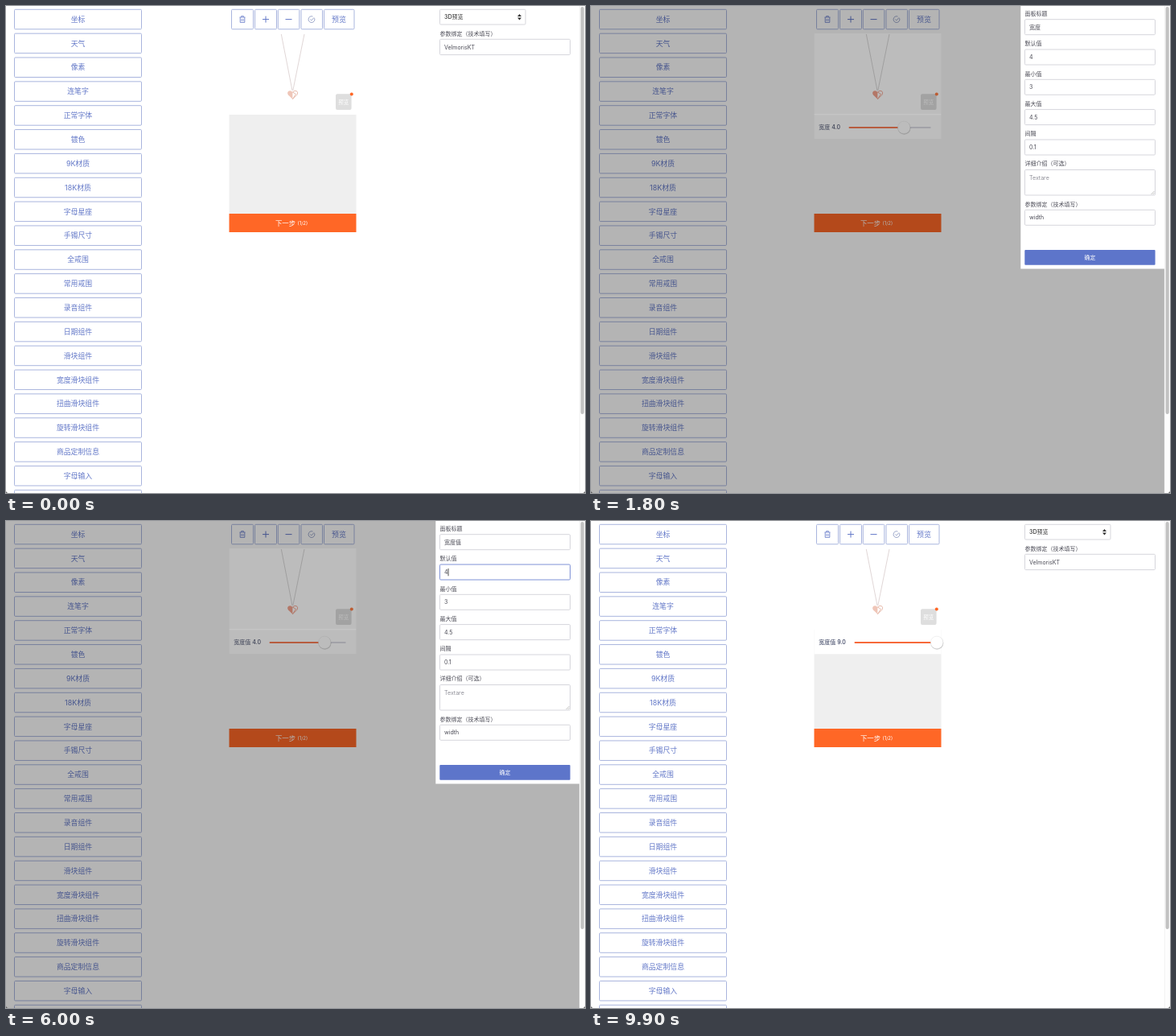
Animation of 720 by 605 pixels, one loop 9950 ms. Source, as an HTML page:

```html
<!DOCTYPE html>
<html lang="zh">
<head>
<meta charset="utf-8">
<style>
html, body { margin: 0; width: 100%; height: 100%; overflow: hidden; background: #fff; }
svg { display: block; width: 720px; height: 605px; }
text { font-family: Inter, "Noto Sans CJK SC", "Noto Sans CJK", sans-serif; white-space: pre; }
</style>
</head>
<body>
<svg id="stage" viewBox="0 0 720 605" xmlns="http://www.w3.org/2000/svg">
  <defs>
    <filter id="soft" x="-30%" y="-60%" width="160%" height="240%"><feGaussianBlur stdDeviation="3"/></filter>
    <linearGradient id="bar" x1="0" y1="0" x2="0" y2="1">
      <stop offset="0" stop-color="#f1f1f2"/><stop offset="1" stop-color="#dedee0"/>
    </linearGradient>
  </defs>
</svg>
<script>
const LOOP = 9950;
const BLUE = '#6378c8', EDGE = '#a9b5de', ORANGE = '#ff6726', INK = '#4a4a55';
const stage = document.getElementById('stage');

function add(parent, tag, attrs, content) {
  const el = document.createElementNS('http://www.w3.org/2000/svg', tag);
  set(el, attrs);
  if (content !== undefined) el.textContent = content;
  parent.appendChild(el);
  return el;
}
function set(el, attrs) {
  for (const k in attrs) el.setAttribute(k, attrs[k]);
}
function show(el, on) { el.style.display = on ? '' : 'none'; }
const group = parent => add(parent, 'g', {});
const rect = (p, x, y, width, height, fill, more) =>
  add(p, 'rect', { x, y, width, height, fill, ...more });
const path = (p, d, stroke, width, more) =>
  add(p, 'path', { d, stroke, 'stroke-width': width, fill: 'none', ...more });
// cy is the middle of the line of text
const label = (p, x, cy, size, fill, str, more) =>
  add(p, 'text', { x, y: cy + size * 0.37, 'font-size': size, fill, ...more }, str);
const MID = { 'text-anchor': 'middle' };

function outlined(p, x, y, w, h) {
  return rect(p, x, y, w, h, '#fff', { rx: 1.2, stroke: EDGE, 'stroke-width': 1 });
}
function field(p, y, h, str, fill = INK) {
  const box = rect(p, 539.5, y, 162, h, '#fff', { rx: 1.2, stroke: '#d6d6dc', 'stroke-width': 1 });
  const text = label(p, 545, y + (h > 25 ? 9.5 : h / 2), 7, fill, str);
  return { box, text, y };
}

// ---------- page ----------
const page = group(stage);
rect(page, 0, 0, 720, 605, '#fff');

const names = ['坐标', '天气', '像素', '连笔字', '正常字体', '镀色', '9K材质', '18K材质', '字母星座',
  '手镯尺寸', '全戒围', '常用戒围', '录音组件', '日期组件', '滑块组件', '宽度滑块组件', '扭曲滑块组件',
  '旋转滑块组件', '商品定制信息', '字母输入', ''];
const items = names.map((name, i) => {
  const y = 4.3 + i * 29.85;
  return {
    box: outlined(page, 10.5, y, 158, 24.5),
    text: label(page, 89.5, y + 12.2, 8.9, BLUE, name, MID)
  };
});
const source = items[14];

// toolbar
[[280.5, 27], [309.5, 27], [338.3, 26.5], [367, 26.5], [395.5, 37.5]]
  .forEach(([x, w]) => outlined(page, x, 4.3, w, 24.5));
path(page, 'M290.5 14H297.5M292.6 13.8V12.6H295.4V13.8M291.2 14.2V20.4H296.8V14.2M293 16V18.8M295 16V18.8', BLUE, 0.8);
path(page, 'M319 16.6H327M323 12.6V20.6M347.5 16.6H355.5', BLUE, 1);
path(page, 'M383.6 15.2A3.9 3.9 0 1 1 381.4 13M378.2 16.5L379.8 18L383 14.4', '#8391bd', 0.8);
label(page, 414, 16.5, 9, BLUE, '预览', MID);

// product preview
const chain = path(page, 'M342.3 35L356 105M371 35L356.8 105', '#d9cccc', 0.8);
const heart = add(page, 'path', {
  d: 'M356.4 115.8L350.8 110.3Q349.2 107.6 351.3 105.8Q354 104.4 356.4 107Z'
});
const heartEdge = path(page, 'M356.4 107Q359 104.3 361.6 105.8Q363.6 107.6 361.9 110.3L356.4 115.8L360.4 109.4Z', '#e5b5a4', 0.9);
const shine = path(page, 'M350.5 122.5Q356.4 118 362 122.5Q360 126 356.4 126.5Q352 126 350.5 122.5Z', '#fff', 0.8, { opacity: 0.7 });
const badge = rect(page, 410, 109.3, 19.6, 19.6, '#dedede', { rx: 2 });
label(page, 419.8, 119.2, 6.5, '#fff', '预览', MID);
add(page, 'circle', { cx: 429.8, cy: 109.5, r: 2, fill: ORANGE });

const tray = rect(page, 277.5, 135, 158, 123, '#efefef');
rect(page, 277.5, 258, 158, 23, ORANGE);
label(page, 335, 269.6, 8.4, '#fff', '下一步');
label(page, 362.5, 270, 6, '#fff', '(1/2)');

// slider row
const slider = group(page);
rect(slider, 277.5, 135, 158, 30.3, '#fff');
const sliderText = label(slider, 283.3, 150.8, 7, '#343c5c', '', { 'font-weight': 500 });
const rail = path(slider, '', '#c9c9d6', 1.6);
const fillRail = path(slider, '', '#f7693a', 2, { 'stroke-linecap': 'round' });
const knob = group(slider);
add(knob, 'circle', { cx: 0.3, cy: 0.8, r: 8.1, fill: '#000', opacity: 0.2 });
add(knob, 'circle', { r: 7.7, fill: '#fff', stroke: '#ddd', 'stroke-width': 0.4 });

// right-hand settings
rect(page, 539.5, 4.3, 106.5, 18.7, '#fff', { rx: 1.2, stroke: '#d6d6dc' });
label(page, 545, 13.8, 7, '#333', '3D预览', { 'font-weight': 500 });
add(page, 'path', { d: 'M636 13L638.5 10L641 13ZM636 14.6L638.5 17.6L641 14.6Z', fill: '#333' });
label(page, 539.5, 34, 7, INK, '参数绑定（技术填写）');
field(page, 41.3, 19.3, 'VelmorisKT');

// ---------- dragged copy ----------
const ghost = group(stage);
rect(ghost, 2, 414, 172, 41, '#000', { rx: 14, opacity: 0.035 });
rect(ghost, 11, 424, 158, 25, '#30406f', { opacity: 0.3, filter: 'url(#soft)' });
rect(ghost, 10, 421.7, 158.5, 25.5, '#748ad2', { rx: 1.2 });
label(ghost, 89.5, 434.2, 8.9, '#fff', '滑块组件', MID);

// ---------- modal ----------
const modal = group(stage);
rect(modal, 0, 0, 713, 605, '#000', { opacity: 0.295 });
rect(modal, 277.5, 34, 158, 131, '#fff', { opacity: 0.1 });
rect(modal, 277.5, 134.3, 158, 0.9, '#fff', { opacity: 0.2 });
rect(modal, 534.3, 0, 178.7, 326.5, '#fff');
[['面板标题', 9], ['默认值', 46.5], ['最小值', 84], ['最大值', 121], ['间隔', 158.5],
  ['详细介绍（可选）', 195.5], ['参数绑定（技术填写）', 246]]
  .forEach(([s, y]) => label(modal, 539.5, y, 7, INK, s));
const title = field(modal, 16.7, 19, '宽度');
const initial = field(modal, 54, 19, '4');
field(modal, 91.3, 19, '3');
const max = field(modal, 128.6, 19, '4.5');
field(modal, 166, 19, '0.1');
field(modal, 203.5, 31.5, 'Textare', '#8f8f98');
path(modal, 'M696.5 234L700.5 230M698.7 234L700.5 232.2', '#999', 0.6);
field(modal, 253.3, 19, 'width');
rect(modal, 539.3, 303, 162.3, 18.8, '#5d75ca', { rx: 1 });
label(modal, 620.5, 312.4, 7, '#fff', '确定', { 'text-anchor': 'middle', 'font-weight': 500 });
const under = path(modal, '', '#333', 0.7);
const caret = path(modal, '', '#222', 0.8);

// input method window
const ime = group(modal);
rect(ime, 564, 36, 140.5, 27, '#000', { rx: 3, opacity: 0.35, filter: 'url(#soft)' });
rect(ime, 563.7, 33.7, 140.8, 28.4, 'url(#bar)', { rx: 3, stroke: '#c4c4c8', 'stroke-width': 0.6 });
path(ime, 'M564 47.8H704.3', '#d0d0d4', 0.6);
const imeText = label(ime, 569, 40.5, 8, '#333', '');
const picks = [569, 591.5, 614.5, 638, 661].map((x, i) =>
  label(ime, x, 55, 7.8, i ? '#333' : '#3a6fe8', ''));
label(ime, 683, 55, 7.5, '#aaa', '<');
label(ime, 691.5, 55, 7.5, '#222', '>', { 'font-weight': 600 });

// ---------- scrollbar and window corners ----------
rect(stage, 713, 0, 7, 605, '#fdfdfd');
path(stage, 'M713.3 0V605', '#e9e9e9', 0.6);
rect(stage, 714.6, 1, 4.2, 506, '#c2c2c2', { rx: 2.1 });
add(stage, 'path', { d: 'M0 602.5Q0.3 604.7 2.5 605H0ZM720 602.5Q719.7 604.7 717.5 605H720Z', fill: '#555' });

// ---------- timeline ----------
const HOVER = 450, GRAB = 600, DROP = 1450, CLOSE = 8000;
const COMMIT = 4700;
const strokes = [[3650, 'z', '在这中子自'], [3800, 'zh', '这找中折招'], [4000, 'zhi', '只之直值知']];
const erase = [[6900, '4.'], [7050, '4'], [7200, ''], [7450, '9']];
const focusSpans = [[title, 2500, 5700], [initial, 5700, 6550], [max, 6550, CLOSE]];

const clamp = u => Math.min(1, Math.max(0, u));
const ease = (t, a, b) => { const u = clamp((t - a) / (b - a)); return u * u * (3 - 2 * u); };
const latest = (list, t) => list.filter(e => t >= e[0]).pop();

function drawSidebar(t, open) {
  const held = t >= HOVER && t < DROP;
  set(source.box, { fill: held ? '#4661c0' : '#fff', stroke: held ? '#bcc7ec' : EDGE });
  set(source.text, { fill: held ? '#fff' : BLUE });
  show(ghost, t >= GRAB && t < DROP);
  const go = ease(t, GRAB, 1200);
  const settle = ease(t, 1200, 1400);
  set(ghost, { transform: `translate(${227 * go + 30 * settle} ${-276 * go + 3 * settle})` });
}

function drawSlider(t, name) {
  const start = name.length > 2 ? 328.5 : 321.5;
  const drag = ease(t, 8350, 9250);
  const value = t < CLOSE ? 4 : 4 + 5 * drag;
  const part = t < CLOSE ? 2 / 3 : (value - 3) / 6;
  const x = start + 101.5 * part;
  sliderText.textContent = `${name} ${value.toFixed(1)}`;
  set(rail, { d: `M${start} 151H422.5` });
  set(fillRail, { d: `M${start} 151H${x}` });
  set(knob, { transform: `translate(${x} 150.8)` });
}

function drawModal(t, name) {
  const key = t < COMMIT ? latest(strokes, t) : null;
  const typed = key ? key[1] : '';
  const edit = latest(erase, t);
  title.text.textContent = name + typed;
  max.text.textContent = edit ? edit[1] : '4.5';

  let active = null, since = 0;
  for (const [f, a, b] of focusSpans) {
    const on = t >= a && t < b;
    set(f.box, { stroke: on ? '#7f92d6' : '#d6d6dc' });
    if (on) { active = f; since = a; }
  }
  // the blink restarts with every key
  for (const [k] of [...strokes, [COMMIT], ...erase]) if (t >= k) since = Math.max(since, k);
  show(caret, active && (t - since) % 1000 < 500);
  if (active) {
    const end = 545.5 + active.text.getComputedTextLength();
    set(caret, { d: `M${end} ${active.y + 5}V${active.y + 14.3}` });
  }

  show(ime, key);
  show(under, key);
  if (key) {
    const end = 545 + title.text.getComputedTextLength();
    set(under, { d: `M559 30.6H${end}` });
    imeText.textContent = typed + '|';
    picks.forEach((p, i) => { p.textContent = `${i + 1}. ${key[2][i]}`; });
  }
}

function draw(t) {
  const open = t >= DROP && t < CLOSE;
  const name = t < COMMIT ? '宽度' : '宽度值';
  drawSidebar(t, open);
  show(modal, open);
  set(modal, { opacity: clamp((t - DROP + 50) / 200) });
  show(slider, t >= DROP);
  show(tray, !open);
  show(shine, open);
  set(chain, { stroke: open ? '#c6c4c4' : '#d9cccc' });
  set(heart, { fill: open ? '#f0927a' : '#efc6b8' });
  set(heartEdge, { stroke: open ? '#ee8f78' : '#e5b5a4' });
  set(badge, { fill: open ? '#d6d6d6' : '#dedede' });
  if (t >= DROP) drawSlider(t, name);
  if (open) drawModal(t, name);
}

function tick(now) {
  draw(now % LOOP);
  requestAnimationFrame(tick);
}
draw(0);
requestAnimationFrame(tick);
</script>
</body>
</html>
```
